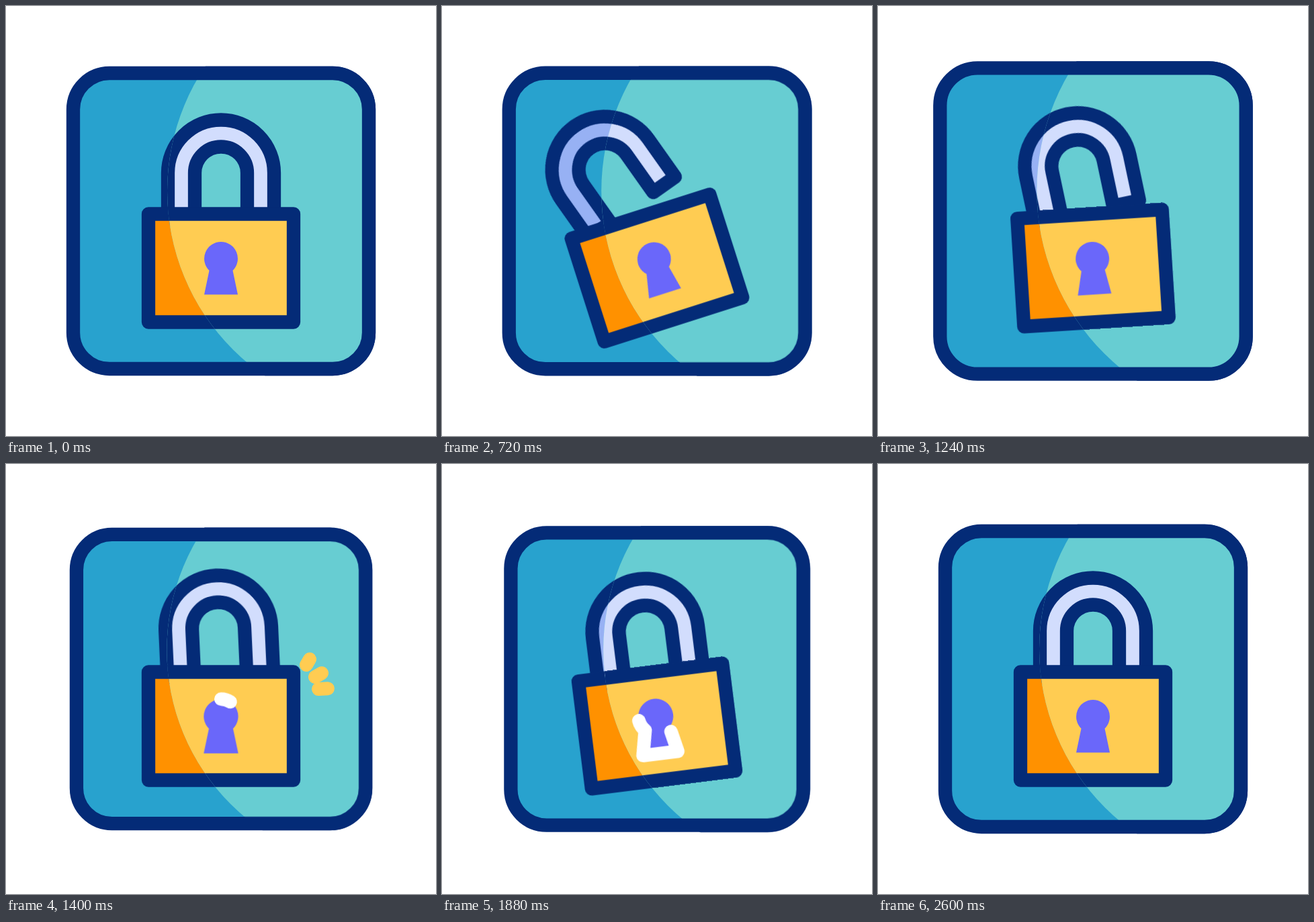
An HTML page without scripts that plays this animation: 640x640 px, repeating every 3 s.

```html
<!DOCTYPE html>
<html lang="en">
<head>
<meta charset="utf-8">
<title>Padlock</title>
<style>
  @property --zoom { syntax: "<number>"; inherits: true; initial-value: 1; }
  @property --grow { syntax: "<number>"; inherits: true; initial-value: 1; }
  @property --tail { syntax: "<number>"; inherits: true; initial-value: 0; }
  @property --tip { syntax: "<number>"; inherits: true; initial-value: 0; }

  html, body { margin: 0; width: 100%; height: 100%; overflow: hidden; background: #fff; }
  svg { display: block; width: 100%; height: 100%; }

  .box, .lock, .shackle, .spot, .key {
    animation: 3s cubic-bezier(.3333, 0, .6667, 1) infinite;
  }

  .dark { --tile: #28a2ce; --metal: #97b1f4; --body: #ff9100; }
  .light { --tile: #67cdd2; --metal: #d2ddfd; --body: #ffcc52; }
  .scene { stroke: #042b77; stroke-width: 20.3px; stroke-linejoin: round; }

  .box {
    fill: var(--tile);
    stroke-width: calc(20.3px / var(--zoom));
    transform: scale(var(--zoom));
    transform-origin: 320px 320px;
    animation-name: zoom;
  }
  .lock { transform-origin: 320px 390px; animation-name: tilt; }
  .shackle { fill: var(--metal); transform-origin: 236px 332px; animation-name: open; }
  .body { fill: var(--body); }
  .spot { cx: 573.5px; cy: 275.5px; r: 333.5px; animation-name: spot; }

  .key {
    fill: #6a67fa;
    transform: scale(var(--grow));
    transform-origin: 320px 390px;
    animation-name: grow;
  }

  /* Strokes drawn between --tail and --tip, in percent of the path */
  .trace {
    fill: none;
    stroke-width: 20px;
    stroke-linecap: round;
    stroke-linejoin: round;
    stroke-dasharray: calc((var(--tip) - var(--tail)) * 1px) 300px;
    stroke-dashoffset: calc(var(--tail) * -1px);
    opacity: 0;
    animation-duration: 3s;
    animation-iteration-count: infinite;
    animation-timing-function: cubic-bezier(.3333, 0, .6667, 1), cubic-bezier(.3333, 0, .6667, 1), step-end;
  }
  .glow {
    stroke: #fff;
    stroke-width: calc(20px / var(--grow));
    animation-name: glow-tip, glow-tail, glow-show;
  }
  .ray { stroke: #ffcc52; animation-name: ray-tip, ray-tail, ray-show; }

  @keyframes zoom {
    0%, 6.667% { --zoom: 1; }
    17.333% { --zoom: .9545; }
    34% { --zoom: 1.086; }
    51.333% { --zoom: .9545; }
    68%, 100% { --zoom: 1; }
  }
  @keyframes spot {
    0%, 6.667% { cx: 573.5px; cy: 275.5px; r: 333.5px; }
    16.667% { cx: 558px; cy: 277.5px; r: 317.5px; }
    32.667% { cx: 597px; cy: 272.5px; r: 364px; }
    51.333% { cx: 558px; cy: 277.5px; r: 317.5px; }
    68%, 100% { cx: 573.5px; cy: 275.5px; r: 333.5px; }
  }
  @keyframes tilt {
    0%, 6.667% { transform: rotate(0deg); }
    19.333%, 30% { transform: rotate(-17.7deg); }
    46% { transform: rotate(0deg); }
    61.333%, 66.667% { transform: rotate(-7.1deg); }
    86.667%, 100% { transform: rotate(0deg); }
  }
  @keyframes open {
    0%, 6.667% { transform: rotate(0deg); }
    19.333%, 30% { transform: rotate(-17.6deg); }
    52%, 100% { transform: rotate(0deg); }
  }
  @keyframes grow {
    0%, 44.667% { --grow: 1; }
    53.333% { --grow: 1.2; }
    66.667%, 100% { --grow: 1; }
  }
  @keyframes glow-tip {
    0%, 42.667% { --tip: 0; }
    70%, 100% { --tip: 100; }
  }
  @keyframes glow-tail {
    0%, 53.333% { --tail: 0; }
    80.667%, 100% { --tail: 100; }
  }
  @keyframes glow-show {
    0% { opacity: 0; }
    42.667% { opacity: 1; }
    80.667%, 100% { opacity: 0; }
  }
  @keyframes ray-tip {
    0%, 44.667% { --tip: 0; }
    51.333%, 100% { --tip: 100; }
  }
  @keyframes ray-tail {
    0%, 46.667% { --tail: 0; }
    54.667%, 100% { --tail: 100; }
  }
  @keyframes ray-show {
    0% { opacity: 0; }
    44.667% { opacity: 1; }
    54.667%, 100% { opacity: 0; }
  }
</style>
</head>
<body>
<svg viewBox="0 0 640 640">
  <clipPath id="lit"><circle class="spot"/></clipPath>

  <g class="scene dark">
    <rect class="box" x="100" y="100" width="440" height="440" rx="54"/>
    <g class="lock">
      <path class="shackle" d="M241 317.5V248.5a79 79 0 0 1 158 0V317.5h-40V248.5a39 39 0 0 0-78 0V317.5z"/>
      <rect class="body" x="212" y="309.5" width="216" height="161"/>
    </g>
  </g>

  <g class="scene light" clip-path="url(#lit)">
    <rect class="box" x="100" y="100" width="440" height="440" rx="54"/>
    <g class="lock">
      <path class="shackle" d="M241 317.5V248.5a79 79 0 0 1 158 0V317.5h-40V248.5a39 39 0 0 0-78 0V317.5z"/>
      <rect class="body" x="212" y="309.5" width="216" height="161"/>
    </g>
  </g>

  <g class="lock">
    <g class="key">
      <path d="M320 351a25 25 0 0 1 17.5 42.8L345 429.5H295L302.5 393.8A25 25 0 0 1 320 351z"/>
      <path class="trace glow" pathLength="100" d="M320 351a25 25 0 0 1 17.5 42.8L345 429.5H295L302.5 393.8A25 25 0 0 1 320 351"/>
    </g>
  </g>

  <path class="trace ray" pathLength="100" d="M447 299L469.5 260.5"/>
  <path class="trace ray" pathLength="100" d="M460 317L505 291"/>
  <path class="trace ray" pathLength="100" d="M465 335L527.5 331.8"/>
</svg>
</body>
</html>
```
